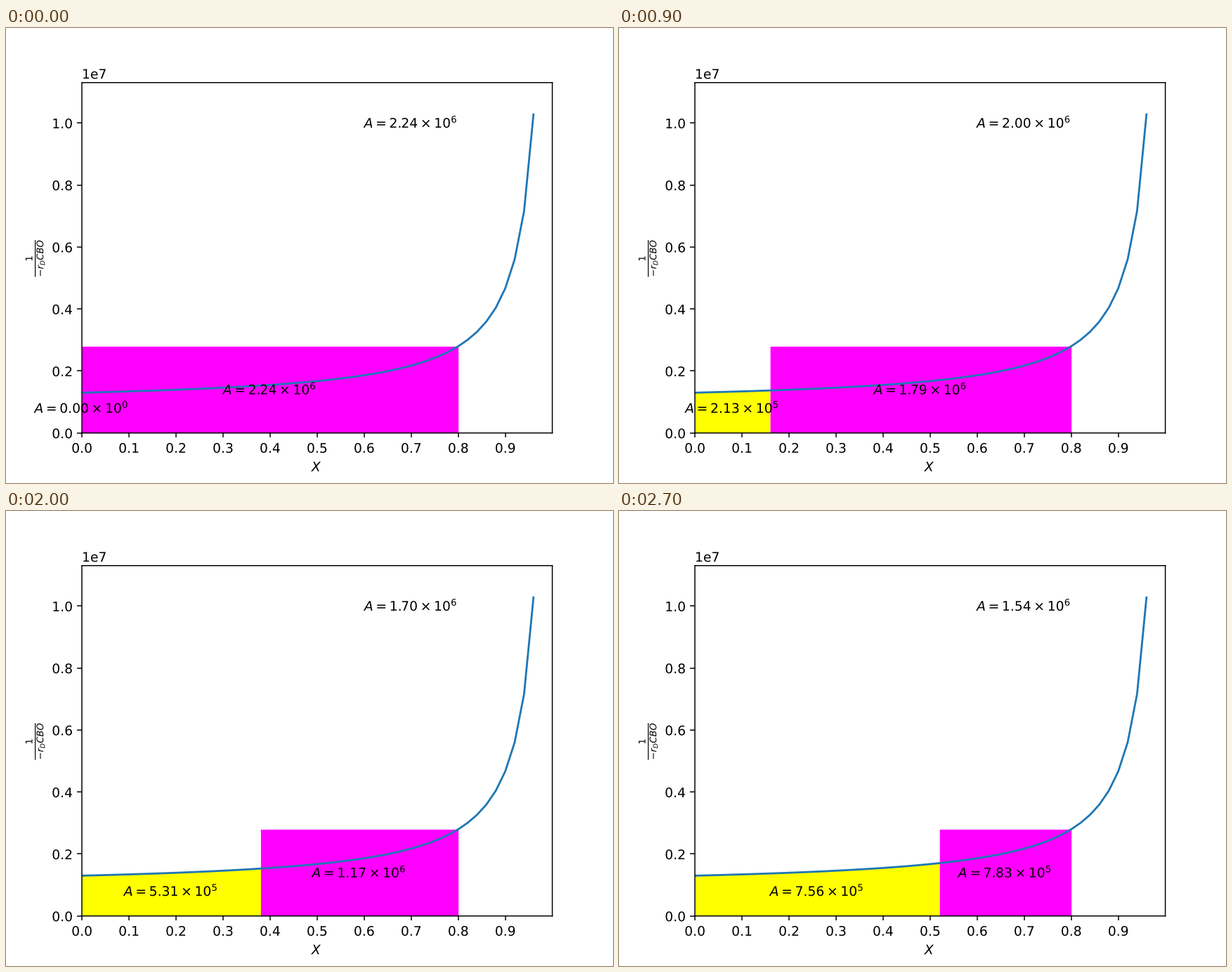
A matplotlib script that plays this animation: 864x648 px, repeating every 8300 ms.

```python
import matplotlib.pyplot as plt
import numpy as np
from matplotlib import patheffects
from matplotlib.animation import FuncAnimation

# Draw shapes and text as outlines at sub-pixel positions.
plt.rcParams["path.snap"] = False
plt.rcParams["path.effects"] = [patheffects.Normal()]

STEP = 0.02
X_END = 0.8
LAST_STEP = 26
FRAMES, INTERVAL = 83, 100


def inverse_rate(x):
    return 0.9257e6 + 0.374e6 / (1 - x)


def area_label(value):
    mantissa, power = f"{value:.2e}".split("e")
    return rf"$A = {mantissa} \times 10^{{{int(power)}}}$"


def trapezoid(x, y):
    return float(np.sum(np.diff(x) * (y[1:] + y[:-1]) / 2))


x = np.arange(49) * STEP
y = inverse_rate(x)
y_end = inverse_rate(X_END)

fig, ax = plt.subplots(figsize=(6.4, 4.8), dpi=135)
ax.plot(x, y)
ax.set_xlim(0, 1)
ax.set_ylim(0, 1.1 * y[-1])
ax.set_xticks(np.arange(10) / 10)
ax.set_xlabel("$X$")
ax.set_ylabel(r"$\frac{1}{-r_DCBO}$")

curve_area = ax.fill_between([0, 0], [0, 0], color="yellow", linewidth=0)
box_area = ax.fill_between([0, X_END], [y_end, y_end], color="magenta", linewidth=0)

centered = dict(ha="center", va="center")
curve_text = ax.text(0, 0.8e6, "", **centered)
box_text = ax.text(0, y_end / 2, "", **centered)
total_text = ax.text(0.7, 1e7, "", **centered)


def update(i):
    k = min(max(i - 1, 0), LAST_STEP)
    xs, ys = x[:k + 1], y[:k + 1]
    split = xs[-1]

    outline = [(0, 0), *zip(xs, ys), (split, 0)]
    curve_area.set_verts([outline])
    box_area.set_verts([[(split, 0), (split, y_end), (X_END, y_end), (X_END, 0)]])

    under_curve = trapezoid(xs, ys)
    in_box = (X_END - split) * y_end
    curve_text.set_x(split / 2)
    box_text.set_x((split + X_END) / 2)
    curve_text.set_text(area_label(under_curve))
    box_text.set_text(area_label(in_box))
    total_text.set_text(area_label(under_curve + in_box))
    return curve_area, box_area, curve_text, box_text, total_text


anim = FuncAnimation(fig, update, frames=FRAMES, interval=INTERVAL,
                     repeat=True, repeat_delay=0, blit=False)
plt.show()
```
